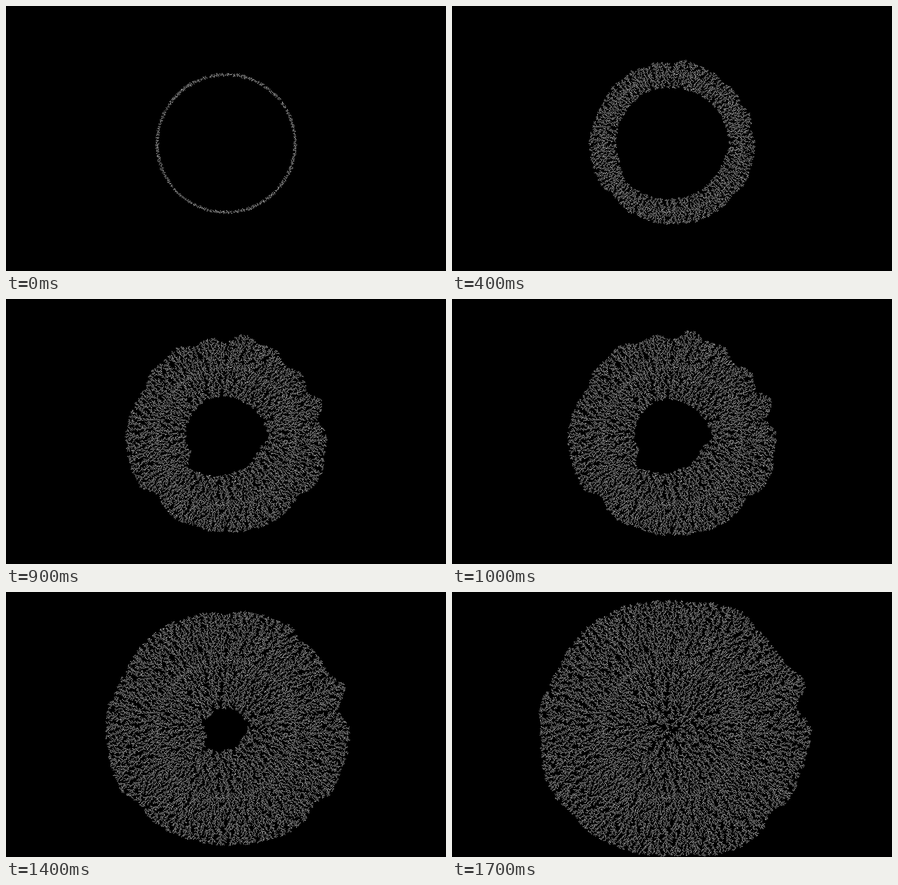
These frames come from a looping animation (964 px wide and 581 px high, 1800 ms). An HTML page with a canvas:

```html
<!DOCTYPE html>
<html lang="en">
<head>
<meta charset="utf-8">
<title>Ring aggregation</title>
<style>
html, body { margin: 0; width: 100%; height: 100%; overflow: hidden; background: #000; }
canvas { display: block; }
</style>
</head>
<body>
<canvas id="stage" width="964" height="581"></canvas>
<script>
const W = 964, H = 581, CX = 482, CY = 301, RING = 151;
const STEP_MS = 100, STEPS = 18, MID = 10, LAST = 17;
const NEVER = 255, DENSITY = 0.27;

// Radii of the growing edges around the ring, clockwise from east.
const outerMid = [229, 226, 232, 228, 212, 218, 221, 220, 218, 216, 218, 214,
  219, 214, 203, 226, 228, 227, 229, 225, 219, 213, 225, 222,
  230, 218, 227, 213, 237, 223, 226, 209, 223, 211, 232, 211];
const outerEnd = [304, 303, 296, 300, 284, 298, 298, 292, 283, 282, 280, 284,
  286, 290, 286, 296, 298, 292, 288, 295, 286, 284, 288, 292,
  291, 290, 285, 283, 283, 293, 300, 290, 285, 288, 310, 278];
const innerMid = [84, 68, 68, 72, 72, 80, 88, 100, 76, 82, 82, 82, 84, 80, 78, 76, 78, 80];

let seed = 20417;
function random() {
  seed = (seed + 0x6D2B79F5) | 0;
  let t = Math.imul(seed ^ (seed >>> 15), 1 | seed);
  t = (t + Math.imul(t ^ (t >>> 7), 61 | t)) ^ t;
  return ((t ^ (t >>> 14)) >>> 0) / 4294967296;
}

function around(profile, turn) {
  const x = turn * profile.length, i = Math.floor(x), f = x - i;
  const a = profile[i % profile.length], b = profile[(i + 1) % profile.length];
  return a + (b - a) * f * f * (3 - 2 * f);
}

// Step at which the growing band reaches a point.
function arrival(dx, dy) {
  const r = Math.hypot(dx, dy);
  const turn = (Math.atan2(dy, dx) / (2 * Math.PI) + 1) % 1;
  let n;
  if (r > RING) {
    const mid = around(outerMid, turn), end = around(outerEnd, turn);
    n = r <= mid ? MID * (r - RING) / (mid - RING)
                 : MID + (LAST - MID) * (r - mid) / (end - mid);
  } else {
    const mid = around(innerMid, turn);
    n = r >= mid ? MID * (RING - r) / (RING - mid)
                 : MID + (LAST - MID) * Math.pow(1 - r / mid, 1 / 1.6);
  }
  if (n < 0.6) return 0;
  const step = Math.max(1, Math.ceil(n - 0.2));
  return step <= LAST ? step : NEVER;
}

const reach = new Uint8Array(W * H).fill(NEVER);
const born = new Uint8Array(W * H).fill(NEVER);
const starts = Array.from({ length: STEPS }, () => []);
const sides = [1, -1, W, -W];
const near = [...sides, W + 1, W - 1, -W + 1, -W - 1];

function neighbours(p) {
  let count = 0;
  for (const d of near) if (born[p + d] !== NEVER) count++;
  return count;
}

function walk(p, step) {
  if (born[p] !== NEVER || neighbours(p) > 2) return;
  for (let i = 0; i < 400; i++) {
    if (neighbours(p)) {
      born[p] = step;
      return;
    }
    const next = p + sides[Math.floor(random() * 4)];
    if (reach[next] <= step) p = next;
  }
}

function shuffle(list) {
  for (let i = list.length - 1; i > 0; i--) {
    const j = Math.floor(random() * (i + 1));
    [list[i], list[j]] = [list[j], list[i]];
  }
  return list;
}

function grow() {
  for (let y = 1; y < H - 1; y++) {
    for (let x = 1; x < W - 1; x++) {
      const step = arrival(x - CX, y - CY), p = y * W + x;
      reach[p] = step;
      if (step !== NEVER && random() < DENSITY) starts[step].push(p);
    }
  }
  for (let i = 0; i < 420; i++) {
    const a = random() * 2 * Math.PI;
    born[Math.round(CY + RING * Math.sin(a)) * W + Math.round(CX + RING * Math.cos(a))] = 0;
  }
  starts.forEach((list, step) => shuffle(list).forEach(p => walk(p, step)));
}

grow();

const ctx = document.getElementById('stage').getContext('2d');
const image = ctx.createImageData(W, H);
const pixels = new Uint32Array(image.data.buffer);
const shades = Uint8Array.from(born, () => 120 + 125 * random());

function draw(step) {
  for (let p = 0; p < pixels.length; p++) {
    const v = born[p] <= step ? shades[p] : 0;
    pixels[p] = 0xFF000000 | (v * 0x10101);
  }
  ctx.putImageData(image, 0, 0);
}

const begin = performance.now();
let shown = -1;
function tick() {
  const step = Math.floor((performance.now() - begin) / STEP_MS) % STEPS;
  if (step !== shown) draw(shown = step);
  requestAnimationFrame(tick);
}
tick();
</script>
</body>
</html>
```
